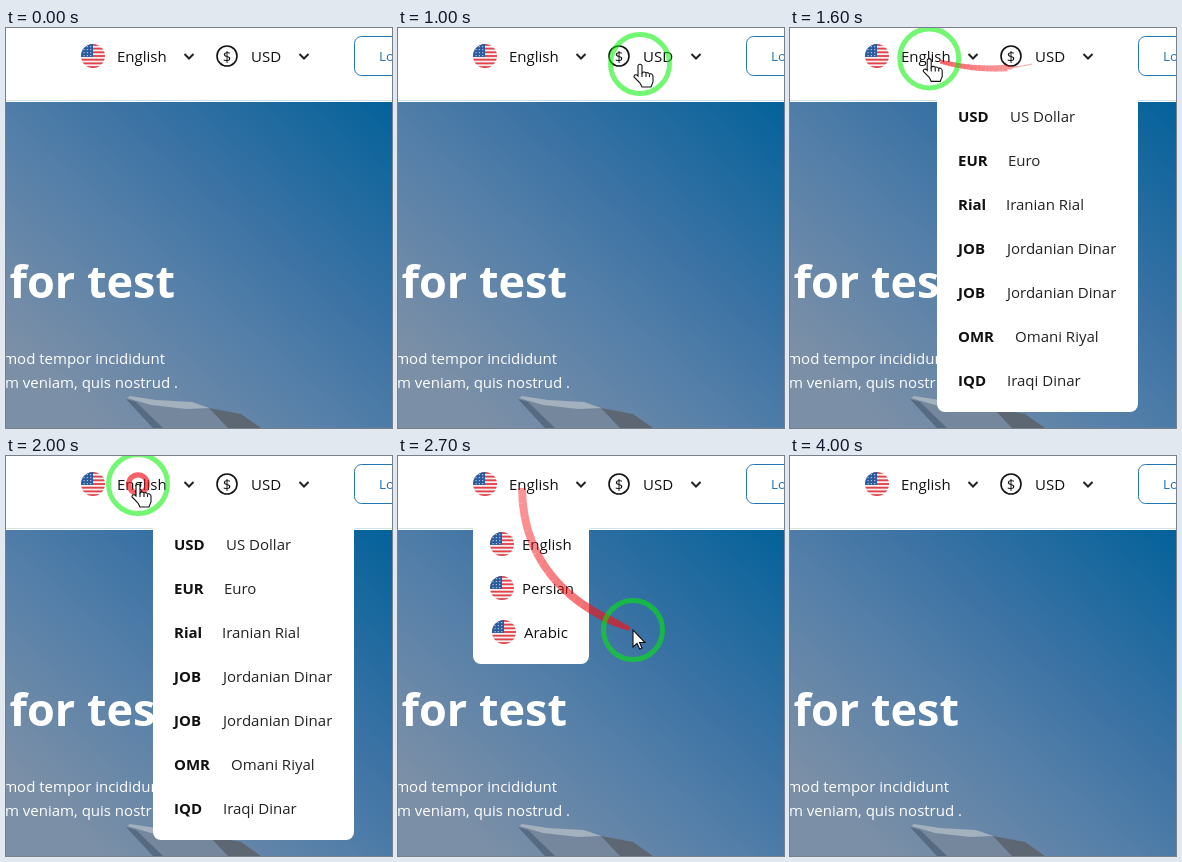
An HTML page with a canvas for the animation above (4100 ms loop, 386 px wide and 400 px high).

```html
<!DOCTYPE html>
<html lang="en">
<head>
<meta charset="utf-8">
<title>Header menus</title>
<style>
html, body { margin: 0; width: 100%; height: 100%; overflow: hidden; background: #fff; }
canvas { display: block; }
</style>
</head>
<body>
<canvas id="stage" width="386" height="400"></canvas>
<script>
const ctx = document.getElementById('stage').getContext('2d');
const LOOP = 4100, STEP = 100;
const FONT = '"Open Sans", "Noto Sans", sans-serif';

const linear = u => u;
const easeOut = u => 1 - (1 - u) ** 2;
const easeIn = u => u * u;
const clamp = v => Math.max(0, Math.min(1, v));

// Pointer moves: start, end, quadratic curve, easing
const moves = [
  [100, 430, [430, 185, 330, 105, 242, 36], linear],
  [1300, 1700, [242, 36, 190, 48, 132, 28], easeOut],
  [2100, 2400, [132, 28, 128, 30, 124, 32], easeOut],
  [2450, 2700, [124, 32, 125, 133, 235, 174], easeOut],
  [3090, 3600, [235, 174, 340, 250, 450, 340], easeIn],
];
const clicks = [[1010, 242, 37], [1920, 132, 28], [3000, 235, 174]];

const currencies = [
  ['USD', 'US Dollar', 220], ['EUR', 'Euro', 218], ['Rial', 'Iranian Rial', 216],
  ['JOB', 'Jordanian Dinar', 217], ['JOB', 'Jordanian Dinar', 217],
  ['OMR', 'Omani Riyal', 225], ['IQD', 'Iraqi Dinar', 217],
];
const languages = [['English', 104], ['Persian', 104], ['Arabic', 106]];

const handPath = new Path2D('M0 1.5Q2-1 4 1.5V9Q6 7 8 9Q10 8 11.5 10Q14 9 15 12V18L13 23H4L2 19L-4 13Q-4 10-1 11L0 12Z');
const handLines = new Path2D('M4 9V13M8 9.5V13M11.5 10.5V13');
const arrowPath = new Path2D('M0 0V17L4 13.5L6.7 19L9 18L6.5 12.5H12Z');

function text(str, x, y, { size = 15, weight = 400, color = '#111', align = 'left' } = {}) {
  ctx.font = `${weight} ${size}px ${FONT}`;
  ctx.fillStyle = color;
  ctx.textAlign = align;
  ctx.fillText(str, x, y);
}

function shape(color, ...points) {
  ctx.fillStyle = color;
  ctx.beginPath();
  points.forEach(([x, y]) => ctx.lineTo(x, y));
  ctx.fill();
}

function ring(x, y, r, width, color) {
  ctx.beginPath();
  ctx.arc(x, y, r, 0, 7);
  ctx.lineWidth = width;
  ctx.strokeStyle = color;
  ctx.stroke();
}

function flag(x, y) {
  ctx.save();
  ctx.beginPath();
  ctx.arc(x, y, 12, 0, 7);
  ctx.clip();
  ctx.translate(x - 12, y - 12);
  ctx.fillStyle = '#f8eeee';
  ctx.fillRect(0, 0, 24, 24);
  ctx.fillStyle = '#e0414b';
  const stripe = 24 / 13;
  for (let i = 0; i < 13; i += 2) ctx.fillRect(0, i * stripe, 24, stripe);
  ctx.fillStyle = '#2b5c9e';
  ctx.fillRect(0, 0, 12, 7 * stripe);
  ctx.fillStyle = '#a9c0dc';
  for (let i = 0; i < 12; i++) ctx.fillRect(2.5 + i % 3 * 3.3, 2 + (i / 3 | 0) * 3, 1.2, 1.2);
  ctx.restore();
}

function chevron(x) {
  ctx.strokeStyle = '#222';
  ctx.lineWidth = 2;
  ctx.beginPath();
  ctx.moveTo(x - 4.5, 26);
  ctx.lineTo(x, 30.5);
  ctx.lineTo(x + 4.5, 26);
  ctx.stroke();
}

function drawPage() {
  ctx.fillStyle = '#fff';
  ctx.fillRect(0, 0, 386, 400);
  ctx.fillStyle = '#d3e3e8';
  ctx.fillRect(0, 72, 386, 1);

  const sky = ctx.createLinearGradient(386, 74, 100, 400);
  sky.addColorStop(0, '#03629a');
  sky.addColorStop(.4, '#3a72a4');
  sky.addColorStop(.65, '#5680a9');
  sky.addColorStop(1, '#7b8fa7');
  ctx.fillStyle = sky;
  ctx.fillRect(0, 74, 386, 326);

  shape('#74879c', [120, 370], [124, 368], [150, 372], [186, 374], [203, 380], [235, 386], [255, 400], [147, 400]);
  shape('#a3b0be', [121, 370], [124, 368], [150, 372], [186, 374], [203, 380], [180, 381], [145, 377]);
  shape('#566a82', [120, 371], [130, 374], [157, 400], [147, 400]);
  shape('#5d6673', [203, 380], [235, 386], [255, 400], [222, 400]);

  text('for test', 169, 270, { size: 45, weight: 700, color: '#fff', align: 'right' });
  const body = { weight: 500, color: '#fff', align: 'right' };
  text('sed do eiusmod tempor incididunt', 159, 336, body);
  text('ad minim veniam, quis nostrud .', 172, 360, body);

  flag(87, 28);
  text('English', 111, 34);
  chevron(183);
  ring(221, 28, 10, 1.6, '#111');
  text('$', 221, 33.5, { weight: 500, align: 'center' });
  text('USD', 245, 34);
  chevron(298);

  ctx.strokeStyle = '#2474b5';
  ctx.lineWidth = 1;
  ctx.beginPath();
  ctx.roundRect(348.5, 8.5, 90, 39, 7);
  ctx.stroke();
  text('Login', 373, 33, { size: 13.5, color: '#2474b5' });
}

const openness = (t, open, close) =>
  easeOut(clamp((t - open) / 190)) * (1 - easeIn(clamp((t - close) / 180)));

// White panel that unrolls downwards while fading in
function menu(x, width, height, amount, drawRows) {
  if (!amount) return;
  ctx.save();
  ctx.globalAlpha = amount;
  ctx.beginPath();
  ctx.roundRect(x, 55, width, height * amount, 8);
  ctx.clip();
  ctx.fillStyle = '#fff';
  ctx.fillRect(x, 55, width, height);
  ctx.translate(0, -Math.round((1 - amount) * 20));
  drawRows();
  ctx.restore();
}

function drawMenus(t) {
  menu(147, 201, 329, openness(t, 1050, 2010), () => currencies.forEach(([code, name, x], i) => {
    text(code, 168, 94 + i * 44, { weight: 700 });
    text(name, x, 94 + i * 44, { color: '#222' });
  }));
  menu(75, 116, 153, openness(t, 2060, 3010), () => languages.forEach(([name, x], i) => {
    flag(x, 88 + i * 44);
    text(name, x + 20, 94 + i * 44);
  }));
}

function pointerAt(t) {
  const [start, end, [x0, y0, cx, cy, x1, y1], ease] = moves.findLast(m => t >= m[0]) || moves[0];
  const s = ease(clamp((t - start) / (end - start))), r = 1 - s;
  return [r * r * x0 + 2 * r * s * cx + s * s * x1, r * r * y0 + 2 * r * s * cy + s * s * y1];
}

// Recent path of the pointer; slow stretches leave no mark
function drawTrail(t) {
  for (let age = 340; age > 0; age -= 10) {
    const [x0, y0] = pointerAt(t - age), [x1, y1] = pointerAt(t - age + 10);
    const speed = Math.hypot(x1 - x0, y1 - y0);
    if (speed < 2.3) continue;
    ctx.lineWidth = Math.max(1, Math.min(8, speed * 1.2 + 1) * clamp((275 - age) / 25));
    ctx.strokeStyle = `rgba(240,20,25,${.8 - age * .0014})`;
    ctx.beginPath();
    ctx.moveTo(x0, y0);
    ctx.lineTo(x1, y1);
    ctx.stroke();
  }
}

function drawPointer(t) {
  const [x, y] = pointerAt(t);
  drawTrail(t);
  for (const [start, cx, cy] of clicks) {
    const age = t - start;
    if (age >= 0 && age < 350)
      ring(cx, cy, 4 + age * .065, 6.5 - age * .015, `rgba(240,10,20,${.8 - age * .002})`);
  }
  ring(x, y, 29.5, 5, 'rgba(0,240,0,.55)');

  const overNav = y < 50;
  ctx.save();
  ctx.translate(overNav ? x - 2 : x, y);
  const cursor = overNav ? handPath : arrowPath;
  ctx.fillStyle = '#fff';
  ctx.fill(cursor);
  ctx.strokeStyle = '#111';
  ctx.lineWidth = 1.1;
  ctx.stroke(cursor);
  if (overNav) ctx.stroke(handLines);
  ctx.restore();
}

function frame(now) {
  const t = Math.floor(now % LOOP / STEP) * STEP;
  drawPage();
  drawMenus(t);
  drawPointer(t);
  requestAnimationFrame(frame);
}
requestAnimationFrame(frame);
</script>
</body>
</html>
```
